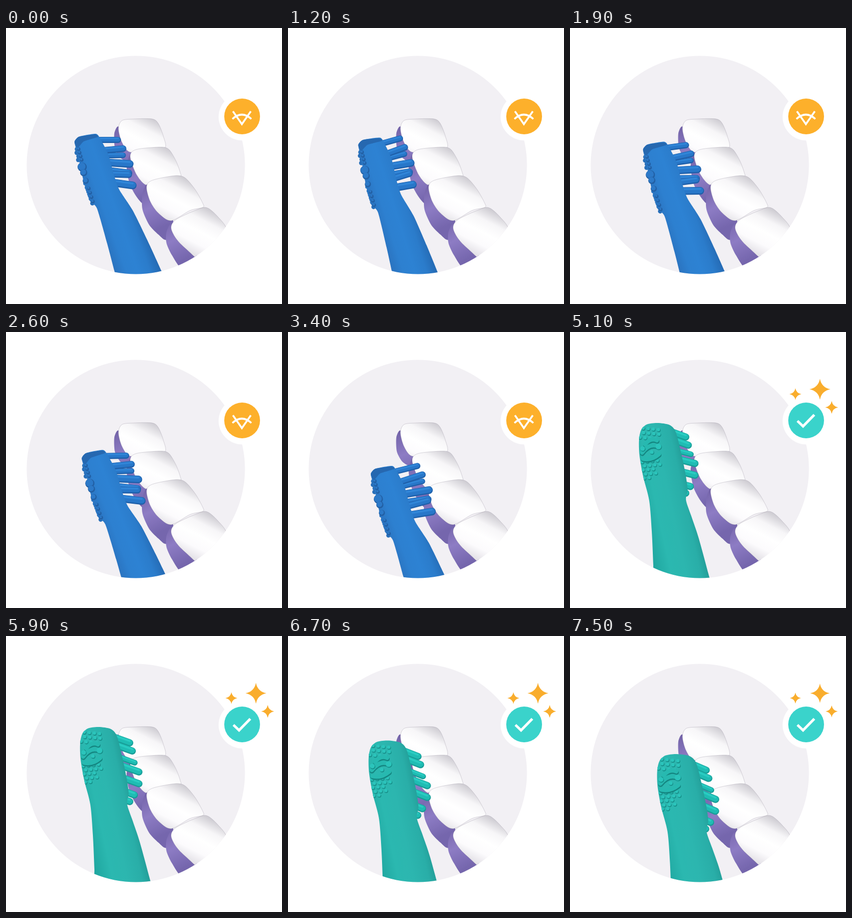
These frames come from a looping animation (540x540 px, 7.6 s). An HTML page with a canvas:

```html
<!DOCTYPE html>
<html lang="en">
<head>
<meta charset="utf-8">
<title>Brushing angle</title>
<style>
html, body { margin: 0; width: 100%; height: 100%; overflow: hidden; background: #fff; }
canvas { display: block; width: 540px; height: 540px; }
</style>
</head>
<body>
<canvas id="stage" width="540" height="540"></canvas>
<script>
const ctx = document.getElementById('stage').getContext('2d');
const LOOP = 7600, SWITCH = 3800, STEP = 100;

// Closed smooth curve through a flat list of x, y pairs.
function blob(p, k = 6) {
  const n = p.length / 2;
  const at = i => [p[2 * ((i + n) % n)], p[2 * ((i + n) % n) + 1]];
  const path = new Path2D();
  path.moveTo(p[0], p[1]);
  for (let i = 0; i < n; i++) {
    const a = at(i - 1), b = at(i), c = at(i + 1), d = at(i + 2);
    path.bezierCurveTo(b[0] + (c[0] - a[0]) / k, b[1] + (c[1] - a[1]) / k,
      c[0] - (d[0] - b[0]) / k, c[1] - (d[1] - b[1]) / k, c[0], c[1]);
  }
  return path;
}

function ramp(x0, y0, x1, y1, ...stops) {
  const g = ctx.createLinearGradient(x0, y0, x1, y1);
  stops.forEach((c, i) => g.addColorStop(i / (stops.length - 1), c));
  return g;
}

function disc(x, y, r, fill) {
  ctx.fillStyle = fill;
  ctx.beginPath();
  ctx.arc(x, y, r, 0, 7);
  ctx.fill();
}

function stroke(path, color, width, cap = 'butt') {
  ctx.strokeStyle = color;
  ctx.lineWidth = width;
  ctx.lineCap = cap;
  ctx.stroke(path);
}

const tooth = (x, y, side, crown) => ({ x, y, side: blob(side, 8), crown: blob(crown, 7) });
const teeth = [
  tooth(219, 178,
    [220, 193, 212, 206, 213, 234, 224, 254, 240, 262, 246, 242, 232, 228],
    [220, 197, 227, 181, 250, 178, 286, 178, 298, 187, 308, 212, 311, 234, 280, 236, 243, 243, 227, 224]),
  tooth(243, 234,
    [244, 248, 236, 270, 242, 305, 256, 331, 270, 343, 281, 306, 256, 285],
    [243, 252, 254, 238, 300, 233, 318, 237, 332, 259, 341, 283, 340, 291, 310, 294, 277, 308, 256, 288]),
  tooth(275, 290,
    [277, 307, 267, 325, 267, 355, 280, 385, 298, 404, 314, 414, 327, 377, 298, 361],
    [275, 311, 286, 298, 330, 289, 350, 293, 370, 316, 385, 343, 385, 351, 360, 357, 323, 377, 298, 362, 282, 339]),
  tooth(323, 352,
    [325, 384, 314, 399, 314, 421, 325, 445, 345, 470, 385, 455, 350, 427],
    [323, 390, 334, 374, 380, 353, 396, 353, 415, 370, 431, 393, 425, 430, 390, 460, 352, 432, 332, 411])
];

function drawTeeth() {
  for (const t of teeth) {
    ctx.fillStyle = ramp(t.x - 8, t.y + 20, t.x + 30, t.y + 100, '#7464a9', '#8d7cc4', '#7566ad');
    ctx.fill(t.side);
    ctx.fillStyle = ramp(t.x + 20, t.y + 80, t.x + 62, t.y - 2, '#e4e2e7', '#fcfbfd', '#ffffff', '#f7f6f8', '#d0ced4');
    ctx.fill(t.crown);
    stroke(t.crown, 'rgba(120,115,130,.35)', 0.8);
  }
}

function tube(x0, y0, x1, y1, w, [dark, mid, light]) {
  const line = d => {
    const p = new Path2D();
    p.moveTo(x0, y0 + d);
    p.lineTo(x1, y1 + d);
    return p;
  };
  stroke(line(0), dark, w, 'round');
  stroke(line(-1), mid, w - 3, 'round');
  stroke(line(-w / 4), light, w / 4, 'round');
}

const blueTones = ['#1f60aa', '#2877c9', '#3186d8'];
const tealTones = ['#179d97', '#1fbcb3', '#2accc2'];

const blueBody = blob([134, 223, 142, 213, 159, 209, 176, 207, 183, 214, 200, 247, 212, 290,
  222, 317, 248, 357, 276, 414, 304, 475, 325, 523, 227, 530, 212, 475, 198, 422,
  178, 353, 164, 338, 152, 300, 140, 246], 9);
const blueFacet = blob([134, 223, 142, 213, 174, 208, 180, 213, 152, 222, 140, 235], 12);

function drawBlue(p) {
  ctx.save();
  ctx.translate(162 + p.x, 210 + p.y);
  ctx.rotate(p.rot * Math.PI / 180);
  ctx.translate(-162, -210);
  const up = -12 * p.roll, back = p.tip;
  // Base x, y and tip x, y of every bristle tuft.
  const tufts = [
    [183, 250, 229, 249, 11], [200, 279, 240, 284, 14],
    [178, 219, 219, 219, 12], [186, 240, 229, 236, 13],
    [196, 263, 242, 266, 15], [205, 286, 240, 287, 13], [212, 303, 248, 308, 15]
  ];
  for (const [x0, y0, x1, y1, w] of tufts) tube(x0, y0, x1 + back, y1 + up, w, blueTones);

  for (let i = 0; i < 4; i++) {
    disc(139 + i * 1.5 - (i % 2) * 2, 237 + i * 7, 4.5, '#286fb9');
    disc(160 + i * 3, 316 + i * 9, 4.3, '#286fb9');
    disc(155 + i * 3, 304 + i * 8, 4, '#2a76c3');
  }
  ctx.fillStyle = ramp(213, 478, 295, 448, '#2a72be', '#2d80d0', '#2d82d3', '#2b7ccb', '#2468b1');
  ctx.fill(blueBody);
  ctx.fillStyle = '#2668b0';
  ctx.fill(blueFacet);

  const nub = (x, y, r) => {
    disc(x, y, r, '#2260a5');
    disc(x - 0.8, y - 1.2, r - 1.5, '#2c79c8');
  };
  nub(149, 272, 9);
  nub(152, 283, 7);
  nub(156, 299, 6);
  for (let i = 0; i < 4; i++) {
    nub(142 + i * 2, 237 + i * 7, 3.6);
    nub(162 + i * 2.7, 314 + i * 8.5, 3.5);
  }
  ctx.restore();
}

const tealBody = blob([125, 212, 129, 192, 140, 181, 161, 178, 185, 182, 197, 196, 208, 239,
  216, 278, 220, 308, 217, 329, 228, 362, 242, 404, 263, 481, 279, 540, 156, 540,
  153, 457, 150, 390, 145, 330, 133, 282, 126, 242], 7);

const ridges = [
  'M131 236Q146 216 163 224', 'M133 248Q149 252 164 239', 'M137 220Q147 206 160 212'
].map(d => new Path2D(d));

function drawTeal(p) {
  ctx.save();
  ctx.translate(160 + p.x, 178 + p.y);
  ctx.rotate(p.rot * Math.PI / 180);
  ctx.scale(p.wide, 1);
  ctx.translate(-160, -178);
  const tips = [[222, 209], [227, 225], [232, 248], [240, 266], [240, 289], [231, 311], [222, 324]];
  tips.forEach(([x, y], i) => {
    const lift = p.lift * (i < 2 ? 0.5 : 1.25);
    tube(x - 36, y - 13 + lift * 0.4, x + p.tip, y + lift, i === 2 ? 11 : 14, tealTones);
  });

  ctx.fillStyle = ramp(128, 330, 238, 306, '#20a8a1', '#2bb8b0', '#2cb6af', '#29aea8', '#1d918c');
  ctx.fill(tealBody);

  ctx.save();
  ctx.clip(tealBody);
  const dot = (x, y, r) => {
    disc(x + 0.8, y + 1.3, r, '#168e88');
    disc(x, y, r - 0.4, '#2bc4bb');
  };
  for (let row = 0; row < 5; row++) {
    for (let col = 0; col < 4; col++) {
      const x = 131 + col * 10 + (row % 2) * 4;
      if (row < 3) dot(x + 2 - row * 3, 188 + row * 9 + col, 3.6);
      if (col * 2 + row < 8) dot(x + row, 254 + row * 8 - col, 3.5);
    }
  }
  ctx.translate(0.5, 2);
  ridges.forEach(r => stroke(r, '#148681', 9, 'round'));
  ctx.translate(-0.5, -2);
  ridges.forEach(r => stroke(r, '#27b9b0', 8, 'round'));
  dot(163, 224, 6);
  dot(150, 235, 4);
  dot(132, 228, 5);
  ctx.restore();
  ctx.restore();
}

const bluePoses = [
  { t: 0, x: 0, y: 0, rot: 0, roll: 0, tip: 0 },
  { t: 1200, x: 4, y: 7, rot: 2.4, roll: 1, tip: -4 },
  { t: 2600, x: 14, y: 24, rot: -1, roll: 0, tip: 2 },
  { t: 3400, x: 28, y: 55, rot: 0.2, roll: 1, tip: 6 },
  { t: 3800, x: 32, y: 60, rot: 0, roll: 0.6, tip: 4 }
];
const tealPoses = [
  { t: 3800, x: -2, y: 0, rot: 0, wide: 1, tip: -13, lift: -15 },
  { t: 4300, x: 0, y: 0, rot: 0, wide: 1, tip: -11, lift: -14 },
  { t: 5900, x: 20, y: 0, rot: 0, wide: 1, tip: 0, lift: 0 },
  { t: 7500, x: 48, y: 53, rot: 0.5, wide: 1.06, tip: -7, lift: 0 },
  { t: 7600, x: 48, y: 54, rot: 0.5, wide: 1.06, tip: -7, lift: 0 }
];

function poseAt(keys, t) {
  let i = 0;
  while (i < keys.length - 2 && t >= keys[i + 1].t) i++;
  const a = keys[i], b = keys[i + 1];
  const u = Math.min(1, (t - a.t) / (b.t - a.t));
  const e = (1 - Math.cos(Math.PI * u)) / 2;
  const pose = {};
  for (const k in a) pose[k] = a[k] + (b[k] - a[k]) * e;
  return pose;
}

function sparkle(x, y, r) {
  ctx.fillStyle = '#f9ad2d';
  ctx.beginPath();
  ctx.moveTo(x, y - r);
  for (let i = 0; i < 4; i++) {
    const a = i * Math.PI / 2, m = a - Math.PI / 4, q = r * 0.22;
    ctx.quadraticCurveTo(x + q * Math.cos(m), y + q * Math.sin(m), x + r * Math.cos(a), y + r * Math.sin(a));
  }
  ctx.fill();
}

const angleIcon = new Path2D('M444 163L461.5 188L479 163M443 178Q461.5 161 480 178');
const checkIcon = new Path2D('M445 174L456 184.5L478 162');

function drawBadge(good, t) {
  disc(462, 174, 46, '#fff');
  disc(462, 173, 35, good ? '#3ad3cb' : '#fdb02b');
  stroke(good ? checkIcon : angleIcon, '#fff', good ? 5 : 3.6);
  if (!good) return;
  const grow = Math.min(1, (t - SWITCH) / 290);
  const fade = Math.min(1, (LOOP + 700 - t) / 860);
  const s = grow * fade;
  if (s <= 0) return;
  sparkle(489, 112, 20.5 * s);
  sparkle(441, 121.5, 11.5 * s);
  sparkle(512, 147.5, 12.5 * s);
}

function draw(t) {
  const good = t >= SWITCH;
  ctx.fillStyle = '#fff';
  ctx.fillRect(0, 0, 540, 540);
  ctx.save();
  ctx.beginPath();
  ctx.arc(254, 268, 213.5, 0, 7);
  ctx.clip();
  ctx.fillStyle = '#f2f0f4';
  ctx.fillRect(0, 0, 540, 540);
  drawTeeth();
  if (good) drawTeal(poseAt(tealPoses, t));
  else drawBlue(poseAt(bluePoses, t));
  ctx.restore();
  drawBadge(good, t);
}

const start = performance.now();
function tick() {
  const t = (performance.now() - start) % LOOP;
  draw(Math.floor(t / STEP) * STEP);
  requestAnimationFrame(tick);
}
tick();
</script>
</body>
</html>
```
